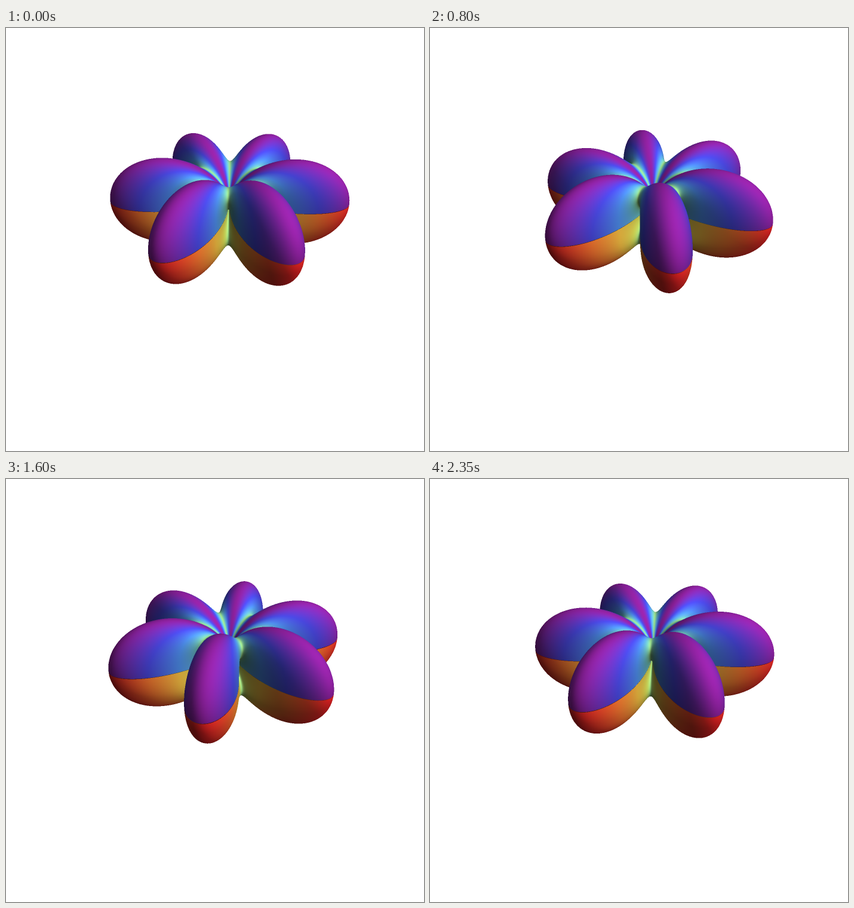
Animation of 700 by 708 pixels, one loop 2400 ms. Source, as an HTML page with a canvas:

```html
<!DOCTYPE html>
<html lang="en">
<head>
<meta charset="utf-8">
<title>Rotating six-lobed surface</title>
<style>
html, body { margin: 0; width: 100%; height: 100%; overflow: hidden; background: #fff; }
canvas { display: block; }
</style>
</head>
<body>
<canvas id="stage" width="700" height="708"></canvas>
<script>
const ctx = document.getElementById('stage').getContext('2d');

const STEP_MS = 50, STEPS = 24, STEP_DEG = 2.5, START_DEG = -1.56;
const RAD = Math.PI / 180;

// Camera: projected origin, pixels per unit, distance and elevation
const CX = 373.8, CY = 291, SCALE = 199.8, DIST = 4.5, ELEVATION = 29.5;
const SIN_E = Math.sin(ELEVATION * RAD), COS_E = Math.cos(ELEVATION * RAD);

// Part of the stage that is rendered, supersampled
const BOX = { x: 160, y: 162, w: 428, h: 292 }, SS = 2;
const W = BOX.w * SS, H = BOX.h * SS;

const ROWS = 80, COLS = 360;
const AMBIENT = 0.35, DIFFUSE = 0.37;
const LIGHTS = [[0, 1, 1], [1, 1, 1], [1, 0, 1]].map(normalize);

const RAINBOW = [
  [120, 28, 134], [62, 60, 190], [68, 124, 205], [92, 165, 165], [131, 186, 112],
  [183, 189, 76], [220, 171, 60], [230, 110, 45], [219, 33, 34]
];

function normalize(v) {
  const n = Math.hypot(v[0], v[1], v[2]) || 1;
  return v.map(c => c / n);
}

function rainbow(v) {
  const s = Math.min(Math.max(v, 0), 1) * (RAINBOW.length - 1);
  const i = Math.min(Math.floor(s), RAINBOW.length - 2);
  return RAINBOW[i].map((c, k) => c + (RAINBOW[i + 1][k] - c) * (s - i));
}

// Surface point in camera axes: right, up, towards the viewer
function surface(theta, phi, turn) {
  const s = Math.sin(theta), c = Math.cos(theta), a = 3 * (phi - turn);
  const r = s * s * Math.hypot(Math.sin(a), c * Math.cos(a));
  const right = r * s * Math.sin(phi), front = r * s * Math.cos(phi), z = r * c;
  return [right, z * COS_E - front * SIN_E, z * SIN_E + front * COS_E];
}

function normalAt(theta, phi, turn, p) {
  const e = 0.0008;
  const diff = (a, b) => a.map((c, k) => c - b[k]);
  const u = diff(surface(theta + e, phi, turn), surface(theta - e, phi, turn));
  const v = diff(surface(theta, phi + e, turn), surface(theta, phi - e, turn));
  const n = normalize([
    u[1] * v[2] - u[2] * v[1],
    u[2] * v[0] - u[0] * v[2],
    u[0] * v[1] - u[1] * v[0]
  ]);
  const outward = n[0] * p[0] + n[1] * p[1] + n[2] * p[2];
  return outward < 0 ? n.map(c => -c) : n;
}

// Violet above the equator, red below, both meeting in green at the creases
function hueAt(phi, turn, side) {
  return 0.5 - 0.5 * side * Math.abs(Math.sin(3 * (phi - turn)));
}

function makeVertex(theta, phi, turn, side) {
  const p = surface(theta, phi, turn);
  const n = normalAt(theta, phi, turn, p);
  let light = AMBIENT;
  for (const l of LIGHTS) {
    light += DIFFUSE * Math.max(0, n[0] * l[0] + n[1] * l[1] + n[2] * l[2]);
  }
  const near = DIST / (DIST - p[2]);
  const color = rainbow(hueAt(phi, turn, side));
  return {
    x: (CX + SCALE * p[0] * near - BOX.x) * SS,
    y: (CY - SCALE * p[1] * near - BOX.y) * SS,
    z: near,
    r: color[0] * light, g: color[1] * light, b: color[2] * light
  };
}

function fillTriangle(a, b, c, pixels, depth) {
  const area = (b.x - a.x) * (c.y - a.y) - (b.y - a.y) * (c.x - a.x);
  if (Math.abs(area) < 1e-9) return;
  const x0 = Math.max(0, Math.ceil(Math.min(a.x, b.x, c.x) - 0.5));
  const x1 = Math.min(W - 1, Math.floor(Math.max(a.x, b.x, c.x) - 0.5));
  const y0 = Math.max(0, Math.ceil(Math.min(a.y, b.y, c.y) - 0.5));
  const y1 = Math.min(H - 1, Math.floor(Math.max(a.y, b.y, c.y) - 0.5));
  for (let y = y0; y <= y1; y++) {
    for (let x = x0; x <= x1; x++) {
      const px = x + 0.5, py = y + 0.5;
      const u = ((b.x - px) * (c.y - py) - (b.y - py) * (c.x - px)) / area;
      const v = ((c.x - px) * (a.y - py) - (c.y - py) * (a.x - px)) / area;
      const w = 1 - u - v;
      if (u < -1e-6 || v < -1e-6 || w < -1e-6) continue;
      const z = u * a.z + v * b.z + w * c.z, i = y * W + x;
      if (z <= depth[i]) continue;
      depth[i] = z;
      pixels[4 * i] = u * a.r + v * b.r + w * c.r;
      pixels[4 * i + 1] = u * a.g + v * b.g + w * c.g;
      pixels[4 * i + 2] = u * a.b + v * b.b + w * c.b;
      pixels[4 * i + 3] = 255;
    }
  }
}

function drawHalf(side, turn, pixels, depth) {
  let previous = null;
  for (let i = 0; i <= ROWS; i++) {
    const t = 0.01 + (Math.PI / 2 - 0.012) * i / ROWS;
    const theta = side > 0 ? t : Math.PI - t;
    const row = [];
    for (let j = 0; j < COLS; j++) {
      row.push(makeVertex(theta, turn + 2 * Math.PI * j / COLS, turn, side));
    }
    for (let j = 0; previous && j < COLS; j++) {
      const k = (j + 1) % COLS;
      fillTriangle(previous[j], previous[k], row[j], pixels, depth);
      fillTriangle(previous[k], row[k], row[j], pixels, depth);
    }
    previous = row;
  }
}

function renderPose(step) {
  const layer = document.createElement('canvas');
  layer.width = W;
  layer.height = H;
  const layerCtx = layer.getContext('2d');
  const image = layerCtx.createImageData(W, H);
  const depth = new Float32Array(W * H);
  const turn = (START_DEG + step * STEP_DEG) * RAD;
  drawHalf(1, turn, image.data, depth);
  drawHalf(-1, turn, image.data, depth);
  layerCtx.putImageData(image, 0, 0);
  return layer;
}

// The shape repeats every 60 degrees, so each pose is rendered once and kept
const poses = [];
let shown = -1;

function tick() {
  const step = Math.floor(performance.now() / STEP_MS) % STEPS;
  if (step !== shown) {
    poses[step] = poses[step] || renderPose(step);
    ctx.fillStyle = '#fff';
    ctx.fillRect(0, 0, 700, 708);
    ctx.drawImage(poses[step], BOX.x, BOX.y, BOX.w, BOX.h);
    shown = step;
  }
  requestAnimationFrame(tick);
}
tick();
</script>
</body>
</html>
```
